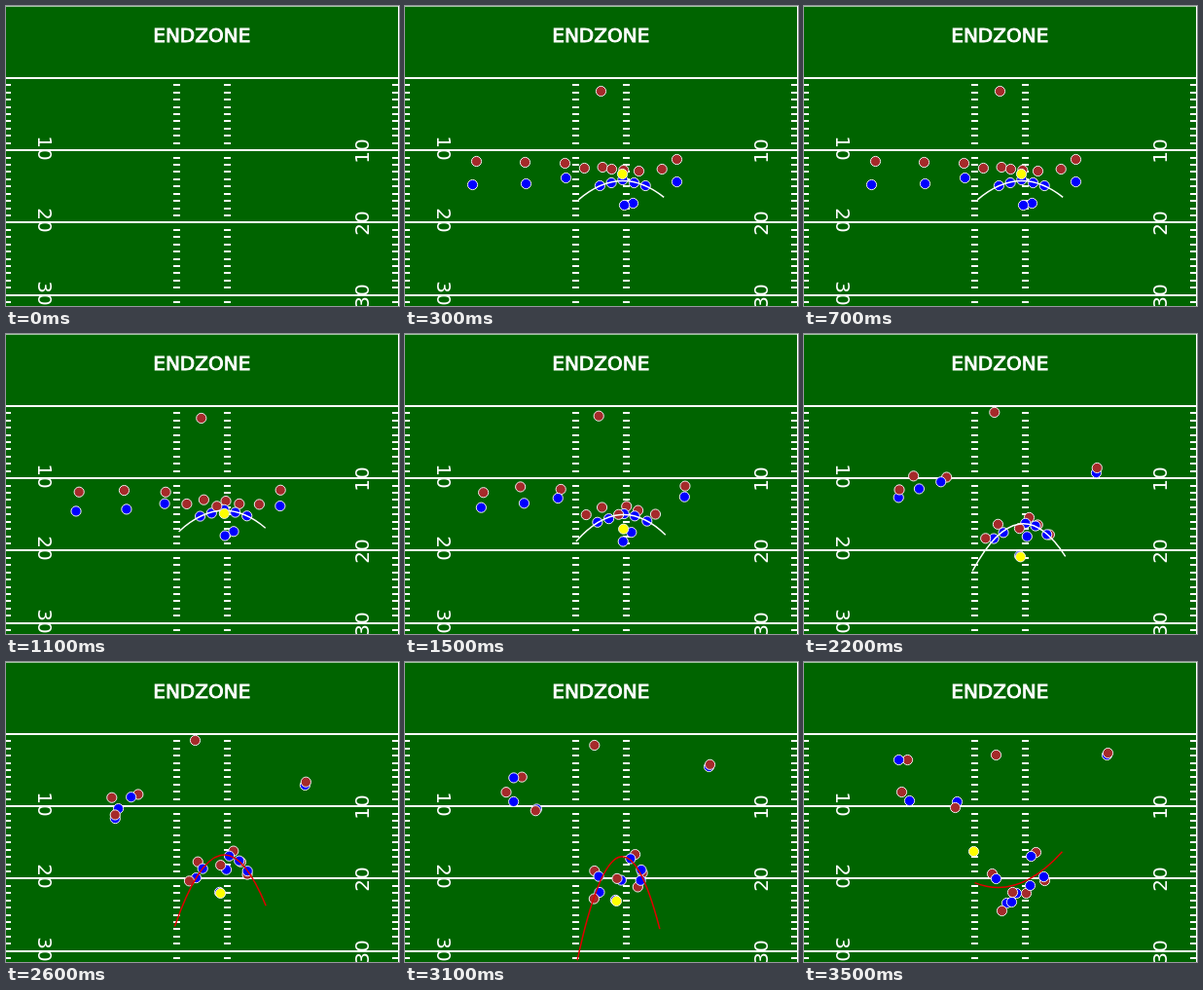
An HTML page that plays this animation: 404 by 308 pixels, repeating every 3.6 s.

```html
<!DOCTYPE html>
<html lang="en">
<head>
<meta charset="utf-8">
<title>Pocket play</title>
<style>
  html, body { margin: 0; width: 100%; height: 100%; overflow: hidden; background: #006400; }
  svg { display: block; width: 404px; height: 308px; }
  text { fill: #fff; font: 20px "DejaVu Sans", sans-serif; text-anchor: middle; }
  .title { stroke: #fff; stroke-width: 0.9; }
  .dot { stroke: #f0f0f0; stroke-width: 1; }
</style>
</head>
<body>
<svg viewBox="0 0 404 308">
  <rect width="404" height="308" fill="#006400"/>
  <g id="field"></g>
  <g id="play" transform="translate(0.5 0.5)"></g>
</svg>
<script>
const LOOP = 3600, STEP = 100;
const SNAP = 700, CAUGHT = 1900, LATE = 2500, THROW = 3100, END = 3500;
const RED = '#a52a2a', BLUE = '#0000ff', YELLOW = '#ffff00';
const field = document.getElementById('field');
const play = document.getElementById('play');

function add(parent, tag, attrs, text) {
  const el = document.createElementNS('http://www.w3.org/2000/svg', tag);
  for (const k in attrs) el.setAttribute(k, attrs[k]);
  if (text) el.textContent = text;
  parent.appendChild(el);
  return el;
}
const clamp = v => Math.min(1, Math.max(0, v));
const mix = (a, b, k) => a.map((v, i) => v + (b[i] - v) * k);
const plus = (a, b) => a.map((v, i) => v + b[i]);

// Field markings: one line per ten yards, one hash per yard
const yardY = n => Math.round(73.9 + n * 7.425);
const bar = (x, y, width, height) => add(field, 'rect', { x, y, width, height, fill: '#fff' });
const label = (n, x, y, turn) =>
  add(field, 'text', { transform: `translate(${x} ${y}) rotate(${turn})`, y: 7.3 }, n);

for (let n = 0; n < 32; n++) {
  const y = yardY(n);
  if (n % 10) {
    for (const x of [-1, 172, 224, 397]) bar(x, y - 1, x < 0 ? 6 : 7, 2);
    continue;
  }
  bar(0, y - 1, 404, 2);
  if (n) {
    label(n, 40, y - 2, 90);
    label(n, 366, y + 1, -90);
  }
}
bar(0, 0, 404, 0.6);
bar(403, 0, 1, 308);
add(field, 'text', { class: 'title', x: 201.3, y: 37.2 }, 'ENDZONE');

// A run bends from start to end and speeds up after the snap; u is 0 to 1
function run(start, bend, end) {
  return u => {
    const p = u ** 1.8;
    return mix(mix(start, bend, p), mix(bend, end, p), p);
  };
}
// A defender follows an opponent while the gap between them changes
function mark(foe, gap, endGap, speed = 1.5) {
  return u => plus(foe(u), mix(gap, endGap, 1 - (1 - u) ** speed));
}
// Linemen start evenly spaced on either side of the center
function block(side, bend, end) {
  return run([223.3 + 11.7 * side, 178 + 3 * Math.abs(side)], bend, end);
}

const line = [
  block(-2, [186, 227], [208, 247]),
  block(-1, [199, 222], [197, 222]),
  block(0, [230, 209], [233, 199]),
  block(1, [238, 207], [246, 220]),
  block(2, [256, 222], [232, 229])
];
const wide = run([69, 183], [111, 157], [157, 143]);
const inner = run([124, 182], [114, 138], [108, 142]);
const slot = run([165, 176], [125, 138], [97, 100]);
const far = run([279, 180], [319, 114], [311, 95]);
const back = run([234, 202], [226, 206], [218, 237]);
const passer = run([225, 204], [219, 247], [213, 246]);
const safety = run([201, 87], [189, 69], [197, 95]);

const dot = fill => add(play, 'circle', { class: 'dot', r: 5.1, fill });
const players = [];
const team = (fill, paths) => paths.forEach(path => players.push({ el: dot(fill), path }));

team(RED, [
  safety,
  mark(slot, [-1, -15], [9, 0]),
  mark(line[1], [-9, -16], [-4, -5]),
  mark(line[2], [1, -10], [5, -4]),
  mark(line[3], [5, -12], [1, 4]),
  mark(line[4], [17, -17], [-4, 8])
]);
team(BLUE, [wide, inner, slot, far, ...line, back, passer]);
team(RED, [
  mark(wide, [4, -24], [-2, 6], 1),
  mark(inner, [-1, -22], [-8, -9]),
  mark(far, [0, -23], [1, -2], 2.5),
  mark(line[0], [-16, -18], [-5, 8]),
  mark(back, [-22, -35], [-4, -1], 2)
]);
const pocket = add(play, 'path', { fill: 'none', 'stroke-width': 1.5 });
const ball = dot(YELLOW);

const clock = t => clamp((t - SNAP) / (END - SNAP));
const hand = t => plus(passer(clock(t)), [1, 1]);

function ballAt(t) {
  if (t < THROW) return mix([223, 172], hand(t), clamp((t - SNAP) / (CAUGHT - SNAP)));
  return mix(hand(THROW), [174, 194], clamp((t - THROW) / (END - THROW)));
}

// Least-squares parabola through the points, by orthogonal polynomials
function fit(points) {
  const sum = f => points.reduce((s, [x, y]) => s + f(x, y), 0);
  const n = points.length, mx = sum(x => x) / n, my = sum((x, y) => y) / n;
  const xx = sum(x => (x - mx) ** 2);
  const skew = sum(x => (x - mx) ** 3) / xx;
  const bow = x => (x - mx) ** 2 - skew * (x - mx) - xx / n;
  const b = sum((x, y) => (x - mx) * y) / xx;
  const c = sum((x, y) => bow(x) * y) / sum(x => bow(x) ** 2);
  return x => my + b * (x - mx) + c * bow(x);
}

function pocketPath(points) {
  const curve = fit(points), xs = points.map(p => p[0]);
  const x0 = Math.min(...xs) - 22, x1 = Math.max(...xs) + 19, mid = (x0 + x1) / 2;
  const y0 = curve(x0), y1 = curve(x1);
  return `M${x0} ${y0}Q${mid} ${2 * curve(mid) - (y0 + y1) / 2} ${x1} ${y1}`;
}

function place(el, [x, y]) {
  el.setAttribute('cx', x);
  el.setAttribute('cy', y);
}

function draw(t) {
  const u = clock(t);
  play.setAttribute('visibility', t < STEP ? 'hidden' : 'visible');
  for (const { el, path } of players) place(el, path(u));
  place(ball, ballAt(t));
  pocket.setAttribute('d', pocketPath(line.map(path => path(u))));
  pocket.setAttribute('stroke', t < LATE ? '#fff' : '#e00000');
}

const start = performance.now();
function tick() {
  const t = (performance.now() - start) % LOOP;
  draw(Math.floor(t / STEP) * STEP);
  requestAnimationFrame(tick);
}
tick();
</script>
</body>
</html>
```
